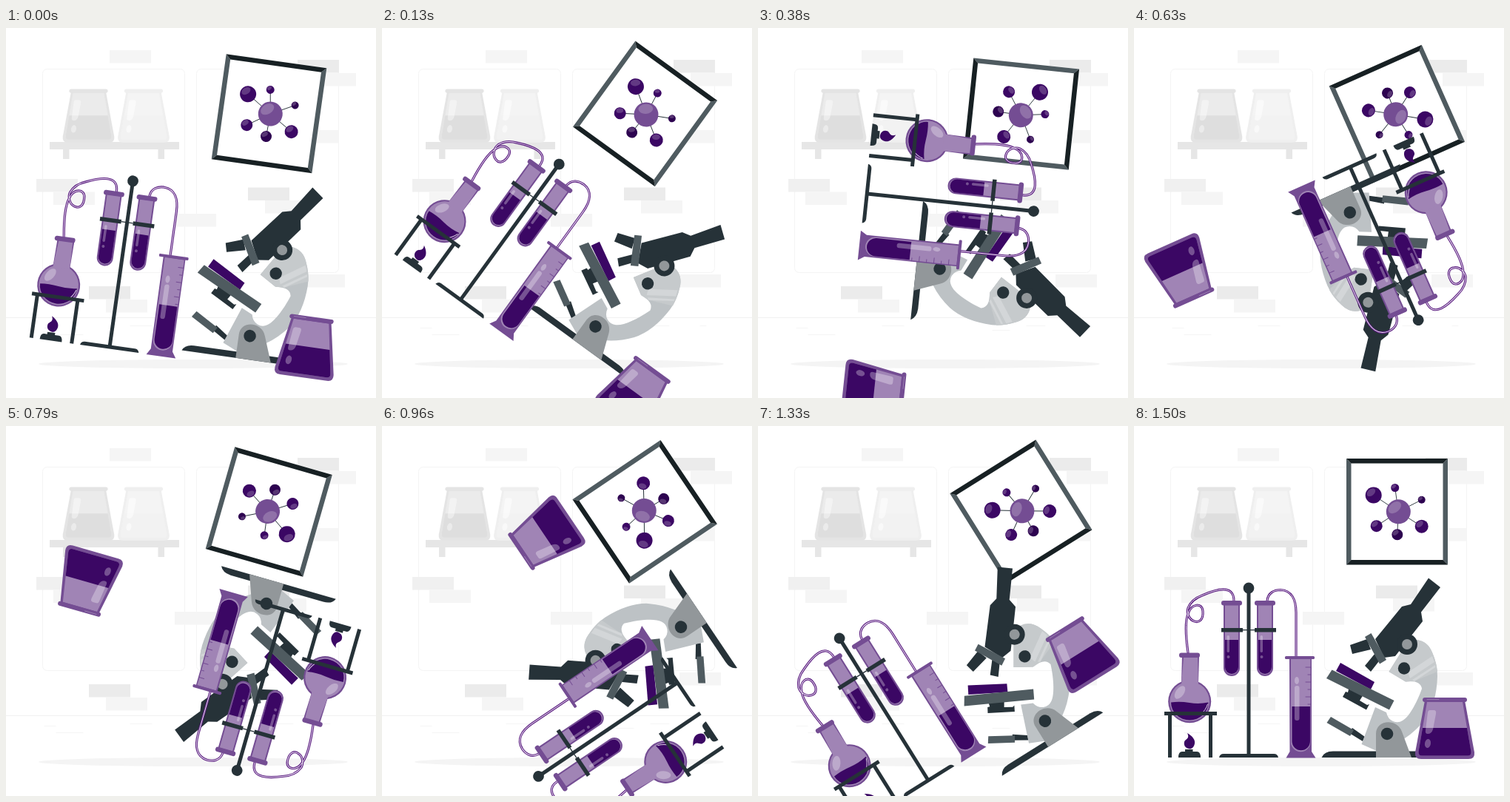
An HTML page for the animation above (1.54 s loop, 500x500 px).

```html
<!DOCTYPE html>
<html lang="en">
<head>
<meta charset="utf-8">
<title>Laboratory</title>
<style>
html, body { margin: 0; width: 100%; height: 100%; overflow: hidden; background: #fff; }
svg { display: block; width: 100vw; height: 100vh; }
</style>
</head>
<body>
<svg id="stage" viewBox="0 0 500 500" xmlns="http://www.w3.org/2000/svg"></svg>
<script>
const INK = '#263238', STEEL = '#4f5b60', GREY = '#92979a', PALE = '#bdc2c5';
const DEEP = '#3b0764', MID = '#744d93', GLASS = '#a084b5', SHINE = 'rgba(255,255,255,.3)';

const rect = (x, y, w, h, fill, r = 0) =>
  `<rect x="${x}" y="${y}" width="${w}" height="${h}" rx="${r}" fill="${fill}"/>`;
const dot = (x, y, r, fill) => `<circle cx="${x}" cy="${y}" r="${r}" fill="${fill}"/>`;
const oval = (x, y, rx, ry, fill, turn = 0) =>
  `<ellipse cx="${x}" cy="${y}" rx="${rx}" ry="${ry}" fill="${fill}" transform="rotate(${turn} ${x} ${y})"/>`;
const path = (d, fill) => `<path d="${d}" fill="${fill}"/>`;
const line = (d, color, w) =>
  `<path d="${d}" fill="none" stroke="${color}" stroke-width="${w}" stroke-linecap="round"/>`;

// Beaker with its rim centred on (0, 0)
function beaker(rim, glass, liquid, shine) {
  return path('M-27 4 L-40 74 Q-41 83 -32 83 H32 Q41 83 40 74 L27 4Z', rim) +
    path('M-24 6 L-35.5 73 Q-36 78.500 -31 78.500 H31 Q36 78.500 35.5 73 L24 6Z', glass) +
    path('M-30 41 L-35.5 73 Q-36 78.500 -31 78.500 H31 Q36 78.500 35.5 73 L30 41Z', liquid) +
    path('M-20 17 H-15 Q-11 17 -12 22 L-16 43 Q-18 49 -23 49 Q-27 49 -26 44 L-23 20 Q-22.5 17 -20 17Z', shine) +
    oval(-23, 62, 4, 6, shine, 10) +
    rect(-30, 0, 60, 6, rim, 3);
}
const place = (x, y, s, body) => `<g transform="translate(${x} ${y}) scale(${s})">${body}</g>`;

function backdrop() {
  const bricks = [[140, 30], [394, 43, 1], [417, 61], [394, 138], [41, 204, 2], [64, 221.5],
    [228, 251], [327, 215.5, 1], [350, 233], [402, 333], [112, 349, 1], [135, 367]];
  const tones = ['#f5f5f5', '#ebebeb', '#f0f0f0'];
  const panel = x => `<rect x="${x}" y="55.5" width="192" height="275" rx="6" fill="none" stroke="#f4f4f4"/>`;
  return panel(49.5) + panel(257.5) +
    bricks.map(([x, y, tone = 0]) => rect(x, y, 56, 17.5, tones[tone])).join('') +
    line('M0 391.5H500', '#f0f0f0', 1) +
    line('M52 405.5H67M68 414.5H104M168 402.5H197M317 408.5H340M363 402.5H388M430 402.5H438', '#f5f5f5', 1) +
    oval(253, 454, 209, 6, '#f4f4f4') +
    rect(59, 154, 175, 10, '#e6e6e6') +
    rect(77, 164, 8.5, 13, '#e6e6e6') + rect(205.5, 164, 8.5, 13, '#e6e6e6') +
    place(111.5, 82.5, .87, beaker('#e4e4e4', '#ebebeb', '#dedede', 'rgba(255,255,255,.4)')) +
    place(186, 82.5, .87, beaker('#efefef', '#f4f4f4', '#f2f2f2', 'rgba(255,255,255,.5)'));
}

function poster() {
  const atoms = [[323.7, 93.5, 11], [352.7, 83.5, 5.5], [388.7, 99.7, 5], [388.7, 135.7, 9],
    [355.8, 146.7, 7.5], [327.7, 135.2, 8]];
  const ball = (x, y, r, fill) => dot(x, y, r, fill) +
    `<g opacity=".2">${oval(x - r * .3, y - r * .35, r * .6, r * .4, '#fff', -40)}</g>`;
  return rect(287, 44, 137, 143.5, '#fff') +
    path('M287 44 L293.5 50.5 V181 L287 187.5Z M424 44 L417.5 50.5 V181 L424 187.5Z', STEEL) +
    path('M287 44 H424 L417.5 50.5 H293.5Z M287 187.5 H424 L417.5 181 H293.5Z', '#172023') +
    atoms.map(([x, y]) => line(`M357.3 115.8L${x} ${y}`, INK, .9)).join('') +
    atoms.map(([x, y, r], i) => ball(x, y, r, i === 2 || i === 4 ? '#2d0350' : DEEP)).join('') +
    ball(357.3, 115.8, 16.5, MID);
}

function microscope() {
  return path('M253.5 448 Q257 439.5 269 439.5 H399 Q411 440 414.5 448Z', INK) +
    path('M295 408 L312 420 L309 426 L291 415Z', INK) +
    path('M266 393 L297 411 L292 419 L260.5 401Z', STEEL) +
    path('M344.5 332 L362 304 L382 289 Q397 291 403 306 Q410 322 410 338 Q409 375 393 397 ' +
      'Q380 413 366 422 L330 440 L307.5 430 L326 380 L341 387 Q343 396 350 399 Q357 402 363 398 ' +
      'C371 394 382 375 389 355 Q387 343 367 345.5Z', PALE) +
    path('M344.5 332 L362 304 L382 289 Q397 291 403 306 Q409 320 410 332 L378 345 L367 345.5Z', '#c6cacc') +
    path('M370 333 L403 311 L406 319 L373 341Z M376 343 L407 323 L407.5 326 L379 345Z', '#d3d6d8') +
    path('M327 448 V416 C327 396 356 395 362 413 L375 448Z', GREY) +
    dot(342, 416, 8.3, INK) +
    path('M291 352 L310 363 L305 371 L315 377 L318 376 L314 383.5 L282 366 L286 359 L289 360Z', INK) +
    path('M279 320 L325 346 L320 356 L273 331Z', DEEP) +
    path('M267.5 329.5 L351.5 371 L345 383.5 L260 341Z', STEEL) +
    path('M292 296 L315 288 L320 302 L295 308Z M312 324 L326 307 L334 314 L320 332Z', INK) +
    path('M398 205.5 L414 218 L388 251.5 L390 264 L353 311 L338 313 L326 288 L362 244 L374 241Z', INK) +
    path('M320.5 280 L341 316 L332 321.5 L312 285Z', STEEL) +
    dot(369, 295, 14, INK) + dot(369, 295, 7, GREY) +
    dot(365, 327.5, 8.2, INK);
}

function testTube(x) {
  return path(`M${x - 11} 240 V327 A11 11 0 0 0 ${x + 11} 327 V240Z`, MID) +
    path(`M${x - 9} 242 V327 A9 9 0 0 0 ${x + 9} 327 V242Z`, GLASS) +
    path(`M${x - 9} 289 V326 A9 9 0 0 0 ${x + 9} 326 V289Z`, DEEP) +
    rect(x - 6.5, 283, 3.5, 23, SHINE, 1.7) +
    dot(x - 4.5, 312, 2, SHINE) +
    rect(x - 14, 236, 28, 6.5, MID, 3);
}

function hose(d) {
  return line(d, '#5b1d80', 3.2) + line(d, '#e9e0f0', 1);
}

function burner() {
  return path('M60 448 Q60 440 65 440 H69 V437 H79.5 V440 H85 Q90 440 90 448Z', INK) +
    path('M72 415 C79 419 83 424 82 429 C81 435 77 437 74 436 C69 435 67 431 68 427 C69 423 76 423 72 415Z', DEEP) +
    rect(46, 389, 5, 59, INK) + rect(101, 389, 5, 59, INK);
}

function flask() {
  return dot(75.2, 372.3, 29, MID) + path('M65 310 H88 L87 348 H64Z', MID) +
    dot(75.2, 372.3, 26.8, GLASS) + path('M67 312 H86 L87 350 H64Z', GLASS) +
    path('M50 373.5 A25.2 24 0 0 0 100.4 373.5 Q88 376 75 374 Q62 372 50 373.5Z', DEEP) +
    line('M99.5 376 Q97 384 90 390', '#dccfe5', 1) +
    oval(62, 360, 5.5, 10, SHINE, 35) +
    rect(61, 306.5, 28, 6.5, MID, 3) +
    rect(41, 386, 71, 5, INK);
}

function cylinder() {
  let ticks = '';
  for (let i = 0; i < 6; i++) ticks += `M${i % 2 ? 235 : 232} ${326 + i * 10}H239`;
  return path('M210 313 H240 V440 L245.5 448.5 H205.5 L210.5 440Z', MID) +
    path('M212 315 H238.5 V427 A13 13 0 0 1 212 427Z', GLASS) +
    path('M213.5 379 H238 V426 A12.2 12.2 0 0 1 213.5 426Z', DEEP) +
    line(ticks, MID, 1) +
    rect(217, 351, 6.5, 47, SHINE, 3) + oval(220, 344, 3, 5, SHINE) +
    rect(204, 311, 40, 4, MID, 1.5);
}

function bench() {
  return hose('M73 306 C70 285 69 264 73 254 C77 240 92 238 93 250 C94 262 88 266 82 264 ' +
      'C74 262 71 252 73 246 C77 236 84 232 92 229 C110 221 135 213 135 236') +
    hose('M180 236 C181 225 190 221.5 198 221.5 C213 222 219 235 219 252 V311') +
    burner() + flask() +
    testTube(132) + testTube(177) +
    rect(152.5, 219, 5, 226, INK) + dot(155, 219, 7.4, INK) +
    path('M115 448 Q116 443 121 443 H189 Q194 443 195 448Z', INK) +
    rect(118, 273, 29, 5.5, INK) + rect(163, 273, 29, 5.5, INK) + rect(147, 275, 16, 1.3, INK) +
    cylinder() +
    place(420, 367, 1, beaker(MID, GLASS, DEEP, SHINE)) +
    line('M396 369.5H412', GLASS, .8);
}

// Each group turns about the middle of its own bounding box
const groups = [
  { draw: poster, x: 355.4, y: 115.9 },
  { draw: microscope, x: 334.6, y: 327.3 },
  { draw: bench, x: 250.9, y: 331.2 }
];
const svg = document.getElementById('stage');
svg.innerHTML = backdrop() + groups.map(g => `<g class="spin">${g.draw()}</g>`).join('');
const nodes = svg.querySelectorAll('.spin');

const LOOP = 1540;

// 24 poses a second, each taken from a 60 per second turn of 4 degrees
function angleAt(ms) {
  const tick = Math.floor((ms % LOOP + .5) / 10);
  const pose = Math.min(36, Math.floor((tick + .49) * .24));
  return 4 * Math.min(90, Math.floor(2.5 * pose + 2));
}

function render(ms) {
  const angle = angleAt(ms);
  groups.forEach((g, i) => nodes[i].setAttribute('transform', `rotate(${angle} ${g.x} ${g.y})`));
}

const start = performance.now();
function loop(now) {
  render(Math.max(0, now - start));
  requestAnimationFrame(loop);
}
render(0);
requestAnimationFrame(loop);
</script>
</body>
</html>
```
